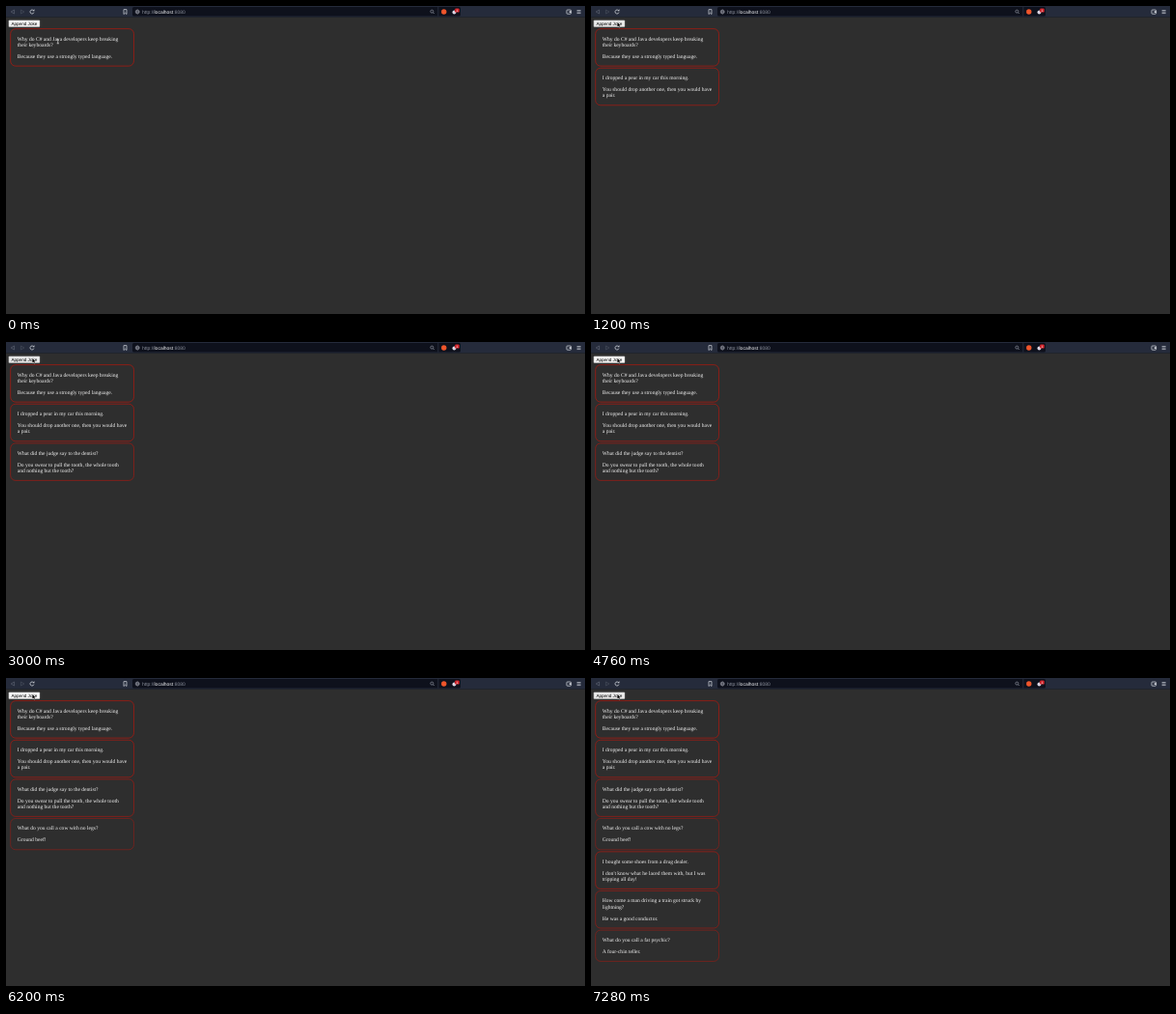
These frames come from a looping animation (600 px wide and 319 px high, 7.32 s). An HTML page with a canvas:

```html
<!DOCTYPE html>
<html lang="en">
<head>
<meta charset="utf-8">
<title>Append Joke</title>
<style>
html, body { margin: 0; width: 100%; height: 100%; overflow: hidden; background: #2e2e2e; }
canvas { display: block; width: 600px; height: 319px; }
</style>
</head>
<body>
<canvas id="stage"></canvas>
<script>
const W = 600, H = 319, LOOP = 7320;
const ZOOM = W / 1728; // the page is laid out in full-size CSS pixels
const SERIF = '"Liberation Serif", "Times New Roman", serif';
const SANS = '"Liberation Sans", Arial, sans-serif';

// at: time of arrival, tone: border strength, text: two paragraphs of lines
const jokes = [
  { at: 0, tone: 1, text: [['Why do C# and Java developers keep breaking', 'their keyboards?'],
    ['Because they use a strongly typed language.']] },
  { at: 1200, tone: 0.95, text: [['I dropped a pear in my car this morning.'],
    ['You should drop another one, then you would have', 'a pair.']] },
  { at: 3000, tone: 0.85, text: [['What did the judge say to the dentist?'],
    ['Do you swear to pull the tooth, the whole tooth', 'and nothing but the tooth?']] },
  { at: 4920, tone: 0.65, text: [['What do you call a cow with no legs?'], ['Ground beef!']] },
  { at: 6360, tone: 0.95, text: [['I bought some shoes from a drug dealer.'],
    ["I don't know what he laced them with, but I was", 'tripping all day!']] },
  { at: 6600, tone: 0.8, text: [['How come a man driving a train got struck by', 'lightning?'],
    ['He was a good conductor.']] },
  { at: 7280, tone: 0.7, text: [['What do you call a fat psychic?'], ['A four-chin teller.']] }
];
const presses = [[920, 1000], [2840, 2920], [4760, 4800], [6200, 6240], [6440, 6520], [7040, 7120]];

const canvas = document.getElementById('stage');
const ctx = canvas.getContext('2d');
const dpr = window.devicePixelRatio || 1;
canvas.width = Math.round(W * dpr);
canvas.height = Math.round(H * dpr);

function rect(x, y, w, h, color) {
  ctx.fillStyle = color;
  ctx.fillRect(x, y, w, h);
}

function roundRect(x, y, w, h, r) {
  ctx.beginPath();
  ctx.roundRect(x, y, w, h, r);
}

function dot(x, y, r, color) {
  ctx.fillStyle = color;
  ctx.beginPath();
  ctx.arc(x, y, r, 0, Math.PI * 2);
  ctx.fill();
}

function path(points, closed) {
  ctx.beginPath();
  points.forEach(([x, y]) => ctx.lineTo(x, y));
  if (closed) ctx.closePath();
}

function stroke(color, width) {
  ctx.strokeStyle = color;
  ctx.lineWidth = width;
  ctx.stroke();
}

function text(str, x, y, font, color) {
  ctx.font = font;
  ctx.fillStyle = color;
  ctx.fillText(str, x, y);
  return x + ctx.measureText(str).width;
}

function drawToolbar() {
  rect(0, 0, W, 11.5, '#252b3b');
  rect(0, 11, W, 0.6, '#1b1e27');

  path([[8.6, 4], [5.2, 6], [8.6, 8]], true);
  stroke('#656b79', 0.6);
  path([[15.4, 4], [18.8, 6], [15.4, 8]], true);
  stroke('#4c5261', 0.6);
  ctx.beginPath();
  ctx.arc(27, 6, 2, 0.3, 5.4);
  stroke('#dfe2e8', 0.7);
  path([[27.5, 5.2], [29.4, 5.2], [29.4, 3.3]], true);
  ctx.fillStyle = '#dfe2e8';
  ctx.fill();

  path([[122, 3.6], [125, 3.6], [125, 8.5], [123.5, 7.2], [122, 8.5]], true);
  stroke('#d4d8e0', 0.7);

  ctx.fillStyle = '#0e111c';
  roundRect(131, 1, 340, 9.6, 1.5);
  ctx.fill();
  rect(447.5, 1, 0.8, 9.6, '#2d3444');

  ctx.beginPath();
  ctx.arc(136.2, 6, 2, 0, Math.PI * 2);
  ctx.moveTo(134.2, 6);
  ctx.lineTo(138.2, 6);
  ctx.ellipse(136.2, 6, 0.9, 2, 0, 0, Math.PI * 2);
  stroke('#b9bdc8', 0.45);

  const font = '5px ' + SANS;
  let x = text('http://', 141, 7.8, font, '#8b909c');
  x = text('localhost', x, 7.8, font, '#f1f2f5');
  text(':8080', x, 7.8, font, '#8b909c');

  ctx.beginPath();
  ctx.arc(441.4, 5.6, 1.5, 0, Math.PI * 2);
  ctx.moveTo(442.5, 6.7);
  ctx.lineTo(443.8, 8);
  stroke('#a4a9b5', 0.6);

  dot(453.8, 6, 2.7, '#f0552b');
  dot(464.5, 6.6, 2, '#d8d3e2');
  ctx.fillStyle = '#d3242b';
  roundRect(465.2, 2.4, 4.6, 4.2, 1.2);
  ctx.fill();
  text('1', 466.7, 5.8, '3.4px ' + SANS, '#ffffff');

  roundRect(581, 4, 4.6, 4.2, 0.8);
  stroke('#dfe2e8', 0.7);
  rect(583.6, 5.4, 2.2, 1.4, '#dfe2e8');
  for (let i = 0; i < 3; i++) rect(591.6, 4 + i * 1.7, 4, 0.65, '#d4d8e0');
}

function drawButton(time, hover) {
  const down = presses.some(([a, b]) => time >= a && time < b);
  ctx.fillStyle = down ? '#f8f8f8' : hover ? '#ebebeb' : '#f4f4f4';
  roundRect(8, 42.5, 93, 20, 2);
  ctx.fill();
  stroke('#777777', 1);
  text('Append Joke', 15.5, 57, '13.333px ' + SANS, '#000000');
}

function drawJoke(joke, top) {
  const lines = joke.text[0].length + joke.text[1].length;
  const height = lines * 18 + 58;
  ctx.globalAlpha = joke.tone;
  roundRect(13.5, top + 0.5, 368, height - 1, 15);
  stroke('#b0180f', 2.1);
  ctx.globalAlpha = 1;

  let y = top + 35;
  for (const paragraph of joke.text) {
    for (const line of paragraph) {
      text(line, 34, y, '16px ' + SERIF, '#f4f4f4');
      y += 18;
    }
    y += 16;
  }
  return height;
}

function pointerAt(time) {
  const step = Math.floor(time / 40) * 40;
  const p = Math.min(1, Math.max(0, step / 520));
  const k = p * p * (3 - 2 * p);
  return { x: 53.8 - 26.4 * k, y: 36.8 - 19.8 * k };
}

function drawPointer({ x, y }) {
  if (y > 30) {
    path([[x, y - 2], [x, y + 2]]);
    ctx.moveTo(x - 1.1, y + 2);
    ctx.lineTo(x + 1.1, y + 2);
    ctx.moveTo(x - 0.9, y - 2);
    ctx.lineTo(x + 0.9, y - 2);
    stroke('#e6e6e6', 0.7);
    return;
  }
  path([[x, y], [x, y + 4.4], [x + 1, y + 3.5], [x + 1.7, y + 5.1],
    [x + 2.4, y + 4.8], [x + 1.8, y + 3.3], [x + 3.1, y + 3.2]], true);
  stroke('#ffffff', 0.7);
  ctx.fillStyle = '#000000';
  ctx.fill();
}

function draw(time) {
  ctx.setTransform(dpr, 0, 0, dpr, 0, 0);
  rect(0, 0, W, H, '#2e2e2e');
  drawToolbar();

  const pointer = pointerAt(time);
  ctx.save();
  ctx.scale(ZOOM, ZOOM);
  drawButton(time, pointer.y < 21.8 && pointer.x < 35);
  let top = 67.5;
  for (const joke of jokes) {
    if (time >= joke.at) top += drawJoke(joke, top) + 5;
  }
  ctx.restore();
  drawPointer(pointer);
}

const start = performance.now();
function tick() {
  draw((performance.now() - start) % LOOP);
  requestAnimationFrame(tick);
}
ctx.textRendering = 'geometricPrecision';
tick();
</script>
</body>
</html>
```
